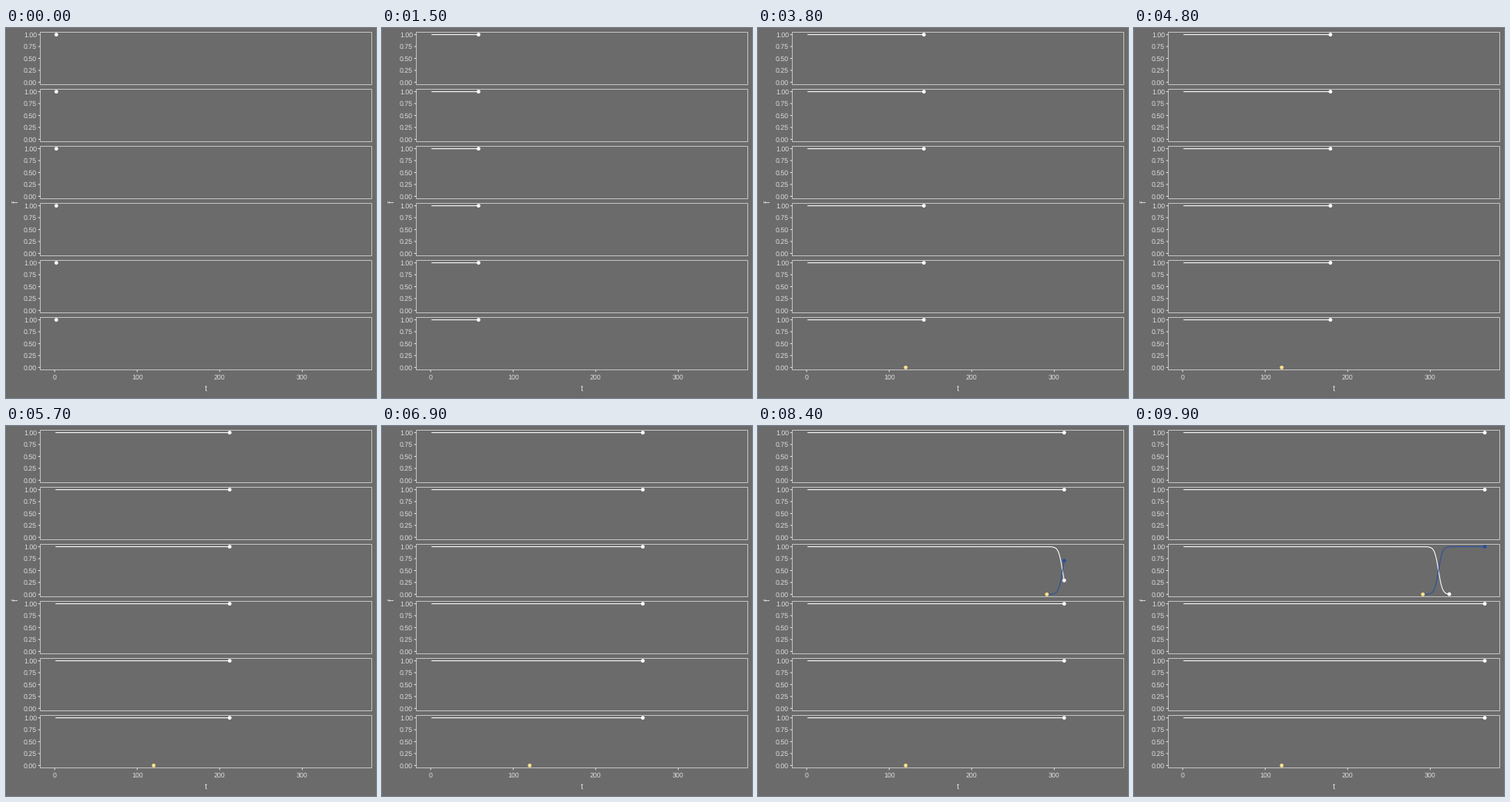
These frames come from a looping animation (480x480 px, 10 s). A matplotlib script:

```python
import matplotlib.pyplot as plt
import numpy as np
from matplotlib.animation import FuncAnimation
from matplotlib.patches import Circle, Rectangle

SIZE, DPI, FRAMES = 480, 100, 100
PX = 72 / DPI
BG, WHITE, BLUE, YELLOW = "#6b6b6b", "#ffffff", "#284f9f", "#ffe08c"
EDGE, TICK, TEXT = "#c4c4c4", "#dedede", "#dedede"
LEFT, WIDTH, HEIGHT, STEP = 44.5, 430, 68, 74
T_START, T_END = 1, 366
SWEEP, BORN, LOST = 2, 291, 323     # panel where the blue line takes over
BLIP, BLIP_T = 5, 120               # panel with the short-lived newcomer

plt.rcParams["font.family"] = "Liberation Sans"
plt.rcParams["text.hinting"] = "none"

fig = plt.figure(figsize=(SIZE / DPI, SIZE / DPI), dpi=DPI, facecolor=BG)
ax = fig.add_axes([0, 0, 1, 1])
ax.set(xlim=(0, SIZE), ylim=(SIZE, 0))
ax.axis("off")


def top(panel):
    return 5.5 + STEP * panel


def px(t):
    return 63.1 + 1.071 * t


def py(panel, f):
    return top(panel) + HEIGHT * (1.05 - f) / 1.1


def share(t):
    return 1 / (1 + np.exp(-0.42 * (t - 309.9)))


def label(x, y, text, size=8.8, **kw):
    ax.text(x, y, text, fontsize=size * PX, color=TEXT, va="baseline", **kw)


def stroke(color, z, xs=(), ys=()):
    line, = ax.plot(xs, ys, color=color, lw=1.07 * PX, zorder=z, snap=False,
                    solid_capstyle="butt")
    return line


def dot(color, z, pos=(0, 0)):
    return ax.add_patch(Circle(pos, 2.4, fc=color, ec="none", zorder=z))


for p in range(6):
    ax.add_patch(Rectangle((LEFT, top(p)), WIDTH, HEIGHT, fill=False,
                           ec=EDGE, lw=PX, snap=False))
    for f in (0, 0.25, 0.5, 0.75, 1):
        y = py(p, f)
        stroke(TICK, 2, [LEFT - 2.75, LEFT], [y, y])
        label(40, y + 3.2, f"{f:.2f}", ha="right")
bottom = top(5) + HEIGHT
for t in (0, 100, 200, 300):
    stroke(TICK, 2, [px(t)] * 2, [bottom, bottom + 2.75])
    label(px(t), 456, str(t), ha="center")
label(259.5, 471, "t", 11, ha="center")
label(16, 225, "f", 11, ha="center", rotation=90, rotation_mode="anchor")

lines = [stroke(WHITE, 3) for _ in range(6)]
heads = [dot(WHITE, 5) for _ in range(6)]
rise, rise_head = stroke(BLUE, 4), dot(BLUE, 6)
blip = dot(YELLOW, 7, (px(BLIP_T), py(BLIP, 0)))
birth = dot(YELLOW, 7, (px(BORN), py(SWEEP, 0)))


def trace(line, head, panel, t, f):
    xs, ys = px(t), py(panel, f)
    line.set_data(xs, ys)
    head.center = xs[-1], ys[-1]


def draw(i):
    # last whole time step that falls within this frame
    now = min(int(T_START + (T_END - T_START) * (i + 0.5) / (FRAMES - 1)), T_END)
    for p in range(6):
        t = np.arange(T_START, (min(now, LOST) if p == SWEEP else now) + 1)
        f = 1 - share(t) if p == SWEEP else np.ones(len(t))
        trace(lines[p], heads[p], p, t, f)

    born = now >= BORN
    if born:
        t = np.arange(BORN, now + 1)
        trace(rise, rise_head, SWEEP, t, share(t))
    for part in (rise, rise_head, birth):
        part.set_visible(born)
    blip.set_visible(now >= BLIP_T)
    return [*lines, *heads, rise, rise_head, blip, birth]


anim = FuncAnimation(fig, draw, frames=FRAMES, interval=100, repeat=True,
                     repeat_delay=0, init_func=lambda: draw(0))
plt.show()
```
